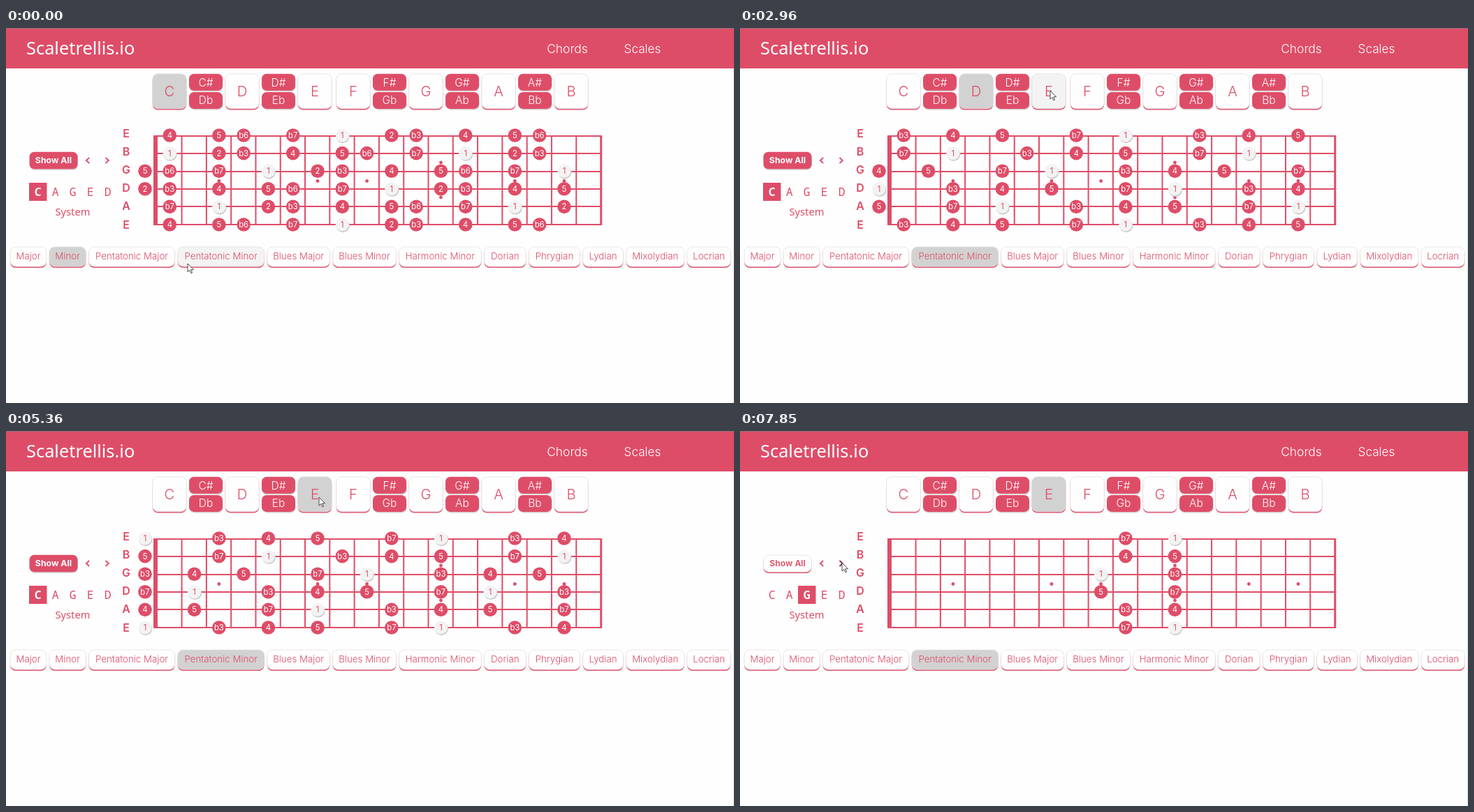
An HTML page that plays this animation: 1042 px wide and 538 px high, repeating every 8 s.

```html
<!DOCTYPE html>
<html lang="en">
<head>
<meta charset="utf-8">
<title>Scale fretboard</title>
<style>
  html, body { margin: 0; width: 100%; height: 100%; overflow: hidden; background: #fefefe; }
  svg { display: block; width: 1042px; height: 538px; }
  text { font-family: Inter, "Open Sans", sans-serif; text-anchor: middle; }
  .title { font-family: "Noto Sans", "Open Sans", sans-serif; text-anchor: start; }
  .system { font-family: "Noto Sans", "Open Sans", sans-serif; }
  .caged { font-family: "Noto Sans Mono", monospace; }
</style>
</head>
<body>
<svg viewBox="0 0 1042 538" xmlns="http://www.w3.org/2000/svg">
  <g id="back"></g>
  <g id="live"></g>
  <path id="cursor" d="M0 0V12L2.8 9.4 4.8 13.8 6.6 13 4.7 8.8H8.5Z" fill="#fff" stroke="#222" stroke-width="0.8"/>
</svg>
<script>
const LOOP = 8000;
const PINK = '#de4d68', WHITE = '#fefefe', HOVER = '#f3f3f3', PICKED = '#d2d2d2';
const CHROMATIC = 'C C# D D# E F F# G G# A A# B'.split(' ');
const FLATS = { 'C#': 'Db', 'D#': 'Eb', 'F#': 'Gb', 'G#': 'Ab', 'A#': 'Bb' };
const DEGREES = '1 b2 2 b3 3 4 b5 5 b6 6 b7 7'.split(' ');
const SCALES = { 'Minor': '1 2 b3 4 5 b6 b7', 'Pentatonic Major': '1 2 3 5 6', 'Pentatonic Minor': '1 b3 4 5 b7' };
const TUNING = [...'EBGDAE'];
const SHAPES = { C: [4, 8], A: [7, 10], G: [9, 12] };
const BUTTON_WIDTHS = {
  'Major': 52, 'Minor': 52.5, 'Pentatonic Major': 123.5, 'Pentatonic Minor': 124, 'Blues Major': 90,
  'Blues Minor': 91, 'Harmonic Minor': 118, 'Dorian': 60, 'Phrygian': 73.5, 'Lydian': 58,
  'Mixolydian': 83.5, 'Locrian': 62.5
};

// Clicks: time and new value
const scaleClicks = [[0, 'Minor'], [410, 'Pentatonic Major'], [1000, 'Pentatonic Minor']];
const rootClicks = [[0, 'C'], [2280, 'D'], [3020, 'E'], [3460, 'F'], [5360, 'E']];
const shapeClicks = [[0, 'C'], [7310, 'A'], [7850, 'G']];
const SHOW_ALL_OFF = 6480;
// Pointer moves: start, end, x, y reached
const MOVES = [
  [50, 250, 196, 332], [850, 1040, 338, 333], [1160, 1690, 201, 205], [1690, 1780, 213, 164],
  [1780, 2250, 340, 92], [2340, 2610, 511, 102], [2780, 2950, 444, 90], [3060, 3320, 495, 92],
  [3520, 3800, 300, 322], [3800, 4140, 81, 195], [4500, 4560, 91, 191], [4560, 5160, 448, 95],
  [5420, 6090, 64, 189], [6600, 7250, 146, 189]
];

const fretX = n => 199 + 35.29 * n;
const noteY = i => 154 + 25.6 * i;
const stringY = i => Math.round(154.75 + 25.4 * i);
const keyX = i => 234 + 52 * i + (i > 4 ? 3 : 0);
const valueAt = (clicks, t) => clicks.filter(c => c[0] <= t).pop()[1];
const smooth = k => k * k * (3 - 2 * k);

function pointer(t) {
  let x = 260, y = 338;
  for (const [start, end, toX, toY] of MOVES) {
    const k = smooth(Math.min(1, Math.max(0, (t - start) / (end - start))));
    x += (toX - x) * k;
    y += (toY - y) * k;
  }
  return [x, y];
}

const rect = (x, y, w, h, fill, rx = 0, more = '') =>
  `<rect x="${x}" y="${y}" width="${w}" height="${h}" rx="${rx}" fill="${fill}" ${more}/>`;
const circle = (x, y, r, fill) => `<circle cx="${x}" cy="${y}" r="${r}" fill="${fill}"/>`;
const line = (x1, y1, x2, y2, w = 2) => `<path d="M${x1} ${y1}L${x2} ${y2}" stroke="${PINK}" stroke-width="${w}"/>`;
const label = (s, x, y, size, fill = PINK, weight = 400, cls = '') =>
  `<text x="${x}" y="${y}" font-size="${size}" fill="${fill}" font-weight="${weight}" class="${cls}">${s}</text>`;

// Raised light button with a coloured lower edge
const lightButton = (x, y, w, h, fill) =>
  rect(x, y + 2, w, h - 2, PINK, 8) +
  rect(x, y, w, h - 1.8, fill, 8, 'stroke="#e6dfe1" stroke-width="0.8"');
const pinkButton = (x, y, w, h) =>
  rect(x + .5, y + 1.5, w, h, '#d6cfd1', 7) + rect(x, y, w, h, PINK, 7);

function drawBack() {
  let s = rect(0, 0, 1042, 58, PINK) + rect(0, 0, 1042, 1, '#92707a') + rect(1041, 58, 1, 480, '#d8d8d8');
  s += label('Scaletrellis.io', 29, 38, 25.4, '#fff', 500, 'title');
  s += label('Chords', 803.5, 35.5, 17.4, '#fff', 300) + label('Scales', 911, 35.5, 17.2, '#fff', 300);
  CHROMATIC.forEach((key, i) => {
    if (!FLATS[key]) return;
    [key, FLATS[key]].forEach((name, j) => {
      s += pinkButton(keyX(i) - 24, 65.7 + 26.2 * j, 48, 24) + label(name, keyX(i), 83.5 + 25.5 * j, 15.5, '#fff', 300);
    });
  });
  TUNING.forEach((name, i) => {
    s += line(212, stringY(i), 853, stringY(i)) + label(name, 172, 157 + 26.1 * i, 16, PINK, 600);
  });
  for (let n = 1; n < 18; n++) s += line(fretX(n) + 17.3, 154, fretX(n) + 17.3, 283);
  s += line(214, 154, 214, 283, 6) + line(851.7, 154, 851.7, 283, 3);
  [3, 7, 9, 15, 17].forEach(n => s += circle(fretX(n), 219.5, 2.4, PINK));
  [193, 243].forEach(y => s += circle(fretX(12), y, 2.4, PINK));
  s += label('System', 95.5, 269, 14.7, PINK, 400, 'system');
  document.getElementById('back').innerHTML = s;
}

function drawNotes(t) {
  const root = CHROMATIC.indexOf(valueAt(rootClicks, t));
  const scale = SCALES[valueAt(scaleClicks, t)].split(' ');
  const [low, high] = t < SHOW_ALL_OFF ? [0, 17] : SHAPES[valueAt(shapeClicks, t)];
  const trail = [0, 40, 80, 120].map(d => pointer(t - d));
  let s = '';
  TUNING.forEach((open, i) => {
    for (let n = low; n <= high; n++) {
      const degree = DEGREES[(CHROMATIC.indexOf(open) + n - root + 12) % 12];
      if (!scale.includes(degree)) continue;
      const x = fretX(n), y = noteY(i), isRoot = degree === '1';
      const touched = trail.some(p => Math.hypot(p[0] - x, p[1] - y) < 9);
      if (isRoot) s += circle(x + .8, y + 1.5, 9.7, '#c9c9c9') + circle(x, y, 9.6, touched ? '#dcdcdc' : HOVER);
      else s += circle(x, y, 9.8, touched ? '#bd4a61' : PINK);
      s += label(degree, x, y + 4, 11.3, isRoot ? PINK : '#fff');
    }
  });
  return s;
}

function drawControls(t) {
  const [px, py] = pointer(t);
  const over = (x, y, w, h) => px >= x && px <= x + w && py >= y && py <= y + h;
  const button = (picked, box) => lightButton(...box, picked ? PICKED : over(...box) ? HOVER : WHITE);
  const root = valueAt(rootClicks, t), scale = valueAt(scaleClicks, t), shape = valueAt(shapeClicks, t);
  let s = '';
  CHROMATIC.forEach((key, i) => {
    if (FLATS[key]) return;
    s += button(key === root, [keyX(i) - 24.3, 65.7, 48.6, 51.8]) + label(key, keyX(i), 98, 20.3, PINK, 300);
  });
  let x = 6;
  for (const [name, w] of Object.entries(BUTTON_WIDTHS)) {
    s += button(name === scale, [x, 314, w, 30]) + label(name, x + w / 2, 332.3, 13.3, PINK, 300);
    x += w + 3.9;
  }
  const all = t < SHOW_ALL_OFF;
  s += all ? pinkButton(33.5, 177.7, 69, 24.6) : button(false, [33.5, 178, 69, 26]);
  s += label('Show All', 68, 194.3, 12.3, all ? '#fff' : PINK, all ? 700 : 600);
  [[117, -1], [144.7, 1]].forEach(([cx, dir]) => {
    const tint = over(cx - 6, 182, 12, 16) ? '#8c2f42' : PINK;
    s += `<path d="M${cx - 2.2 * dir} 186l${4.4 * dir} 4l${-4.4 * dir} 4" fill="none" stroke="${tint}" stroke-width="1.8"/>`;
  });
  [...'CAGED'].forEach((c, i) => {
    const on = c === shape;
    if (on) s += rect(33 + 25 * i, 222, 25.5, 26, PINK);
    s += label(c, 45.6 + 25 * i, 241, 16.5, on ? '#fff' : PINK, on ? 600 : 500, 'caged');
  });
  return s;
}

const live = document.getElementById('live'), cursor = document.getElementById('cursor');
function draw(t) {
  live.innerHTML = drawNotes(t) + drawControls(t);
  cursor.setAttribute('transform', `translate(${pointer(t).join(' ')})`);
}

drawBack();
draw(0);
const start = performance.now();
function tick() {
  draw((performance.now() - start) % LOOP);
  requestAnimationFrame(tick);
}
requestAnimationFrame(tick);
</script>
</body>
</html>
```
